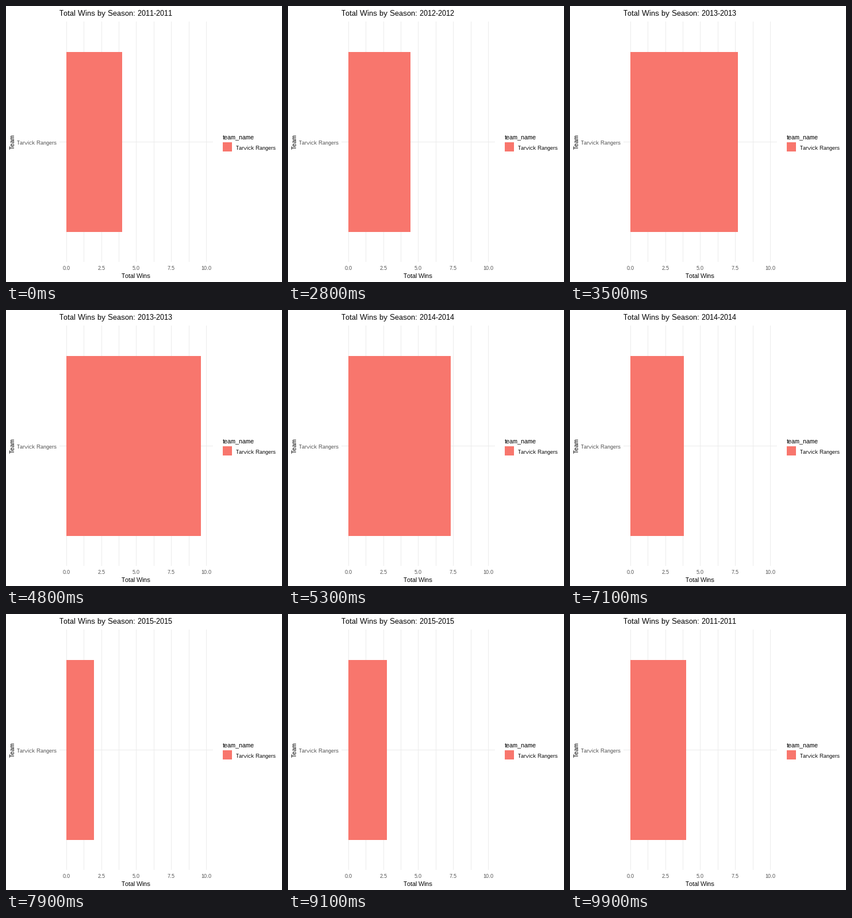
Write a matplotlib script that moves like this. It is 480x480 px and loops after 10000 ms.

```python
import matplotlib.pyplot as plt
from matplotlib.animation import FuncAnimation
from matplotlib.patches import Rectangle

# Whole-pixel glyph hinting without kerning, as in screen text
plt.rcParams.update({
    "font.family": "Liberation Sans",
    "text.hinting": "native",
    "text.hinting_factor": 1,
    "text.kerning_factor": 6,
})

SIZE, DPI = 480, 72
FRAMES, INTERVAL = 100, 100
HOLD, MOVE = 7, 13            # ticks at rest, ticks in transition
CYCLE = HOLD + MOVE

TEAM = "Tarvick Rangers"
SEASONS = [(2011, 4), (2012, 4), (2013, 10), (2014, 5), (2015, 2)]

X0, UNIT = 104.8, 24.32       # pixel position of zero, pixels per win
LEFT, RIGHT, TOP, BOTTOM = 93, 360, 27, 445
BAR_TOP, BAR_BOTTOM = 80, 393
CORAL, GRID, GREY = "#F8766D", "#EBEBEB", "#4D4D4D"

fig = plt.figure(figsize=(SIZE / DPI, SIZE / DPI), dpi=DPI, facecolor="white")
ax = fig.add_axes([0, 0, 1, 1])
ax.set_xlim(0, SIZE)
ax.set_ylim(SIZE, 0)
ax.axis("off")


def px(wins):
    return round(X0 + UNIT * wins)


def box(x, y, w, h, color):
    return ax.add_patch(Rectangle((x, y), w, h, fc=color, lw=0, antialiased=False))


def label(x, y, text, size, color="black", ha="left", rotation=0):
    return ax.text(x, y, text, size=size, color=color, ha=ha, va="baseline",
                   rotation=rotation, rotation_mode="anchor")


# Panel grid and axis labels
for i in range(9):
    box(px(1.25 * i), TOP, 1, BOTTOM - TOP, GRID)
    if i % 2 == 0:
        label(px(1.25 * i), 459, f"{1.25 * i:.1f}", 9, GREY, "center")
box(LEFT, 236, RIGHT - LEFT, 1, GRID)
label(88, 241, TEAM, 9, GREY, "right")
label(226, 473, "Total Wins", 11, ha="center")
label(15, 236, "Team", 11, ha="center", rotation=90)

# Legend
label(377, 231, "team_name", 11)
box(377, 237, 16, 16, CORAL)
label(400, 250, TEAM, 9)

title = label(93, 17, "", 13)
bar = box(px(0), BAR_TOP, 0, BAR_BOTTOM - BAR_TOP, CORAL)


def update(frame):
    # The 101-tick timeline is resampled to 100 frames, skipping the middle tick.
    tick = round(frame * FRAMES / (FRAMES - 1))
    state, phase = divmod(tick, CYCLE)
    year, wins = SEASONS[state % len(SEASONS)]
    next_year, next_wins = SEASONS[(state + 1) % len(SEASONS)]

    t = max(0, phase - HOLD) / MOVE
    shown = next_year if t > 0.5 else year
    title.set_text(f"Total Wins by Season: {shown}-{shown}")
    bar.set_width(px(wins + (next_wins - wins) * t) - px(0))
    return title, bar


anim = FuncAnimation(fig, update, frames=FRAMES, interval=INTERVAL,
                     repeat=True, repeat_delay=0, blit=False)
plt.show()
```
